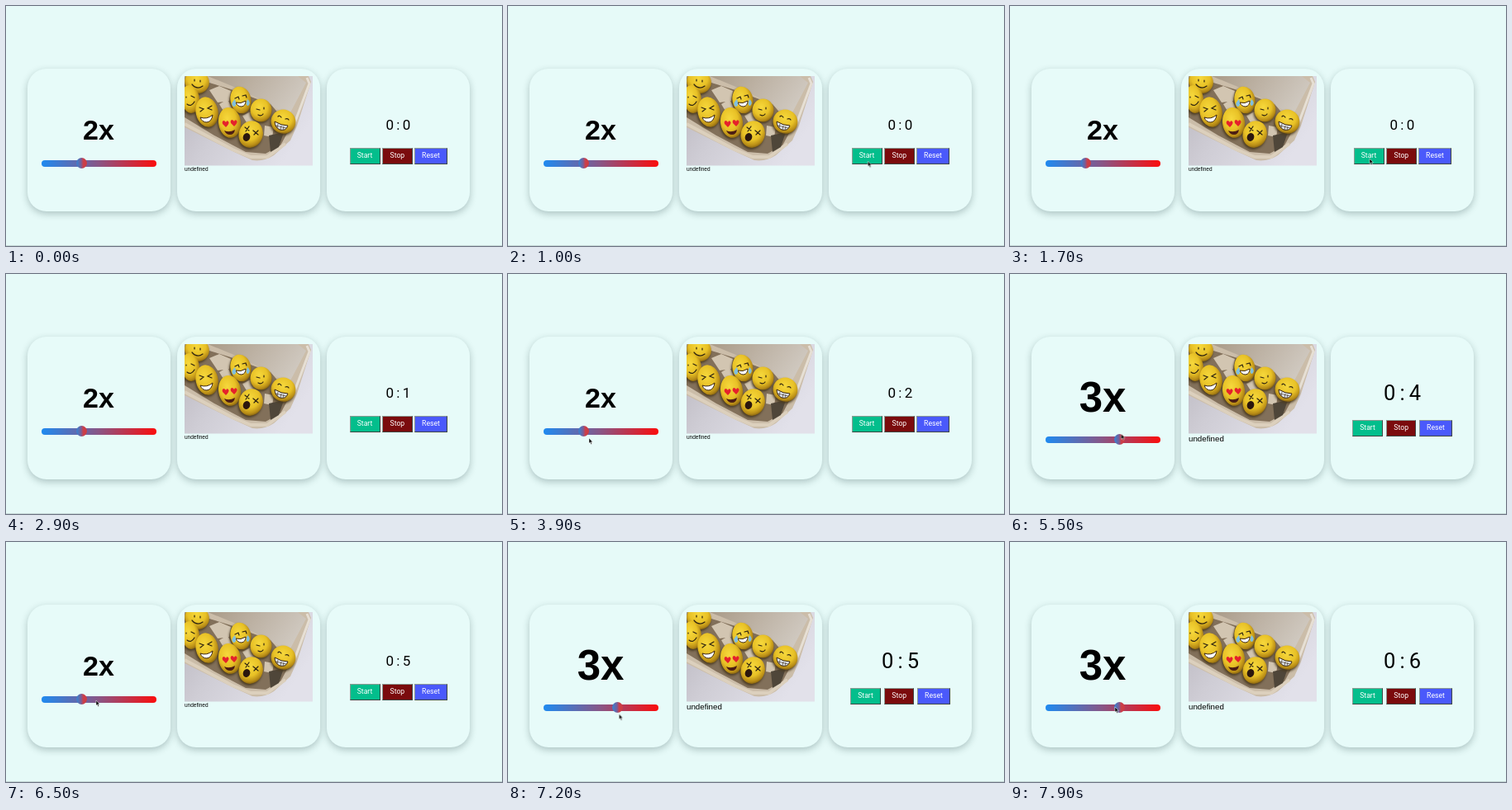
Recreate the animation shown at these times as an HTML page. Size 600 px wide and 291 px high, loop 8 s.

```html
<!DOCTYPE html>
<html lang="en">
<head>
<meta charset="utf-8">
<title>Three cards</title>
<style>
  html, body { margin: 0; width: 100%; height: 100%; overflow: hidden; }
  body { background: #e6faf8; font-family: "Liberation Sans", Arial, sans-serif; color: #000; }

  /* --v is the slider value; sizes and positions follow from it */
  .stage {
    --v: 2;
    position: relative; width: 600px; height: 291px; overflow: hidden;
    animation: zoom 8s step-end infinite;
  }
  .stage > * { position: absolute; box-sizing: border-box; white-space: nowrap; }
  .floor { left: 0; top: 290px; width: 600px; height: 1px; background: #c6d9d7; }

  .card {
    top: 76px; width: 173px; height: 172.5px; border-radius: 23px;
    background: #e7fbf9; box-shadow: 0 3px 8px rgba(20, 50, 50, .27);
  }

  .title {
    left: 25.5px; width: 173px; top: 110.3px; line-height: 80px; text-align: center;
    font-weight: bold; font-size: calc(var(--v) * 17px);
  }
  .title::before { content: "2x"; animation: title 8s step-end infinite; }

  .track {
    left: 43px; width: 138.5px; height: 8px; border-radius: 4px;
    top: calc(167px + var(--v) * 10px);
    background: linear-gradient(90deg, #1f8af0, #8a5585 50%, #fb0d0d);
  }
  .thumb {
    width: 13px; height: 13px; border-radius: 50%;
    left: calc(1.7px + var(--v) * 41.5px); top: calc(164.3px + var(--v) * 10px);
    background: linear-gradient(90deg, #3f7cca 10%, #775d98 45%, #c8404c 65%, #d03a40);
  }

  .photo { left: 216px; top: 85px; }
  .caption { left: 216px; top: 193.9px; line-height: 1.15; font-size: calc(var(--v) * 3.25px); }

  .timer, .btn { font-family: Roboto, Arial, sans-serif; }
  .timer {
    left: calc(474px - var(--v) * 7.3px); top: 124px; line-height: 40px;
    font-size: calc(var(--v) * 8.5px); letter-spacing: .2em;
  }
  .timer::before { content: "0:0"; animation: count 8s step-end infinite; }

  .btn {
    top: calc(162px + var(--v) * 5px); height: 19.5px; line-height: 17.5px;
    border: 1px outset #8c9a93; color: #fff; font-size: 8.7px; text-align: center;
  }
  .start { left: calc(418.5px - var(--v) * 1.5px); width: 37px; background: #03be8c; }
  .stop  { left: calc(455.5px - var(--v) * .2px); width: 36.5px; background: #7b0b0d; }
  .reset { left: calc(492px + var(--v) * 1px); width: 40px; background: #4a59fb; }

  .cursor {
    left: 0; top: 0; overflow: visible;
    animation: move 8s ease-in-out infinite, show 8s step-end infinite;
  }

  @keyframes zoom { 0%, 100% { --v: 2; } 64% { --v: 3; } 76% { --v: 2; } 87% { --v: 3; } }
  @keyframes title {
    0%, 100% { content: "2x"; } 64% { content: "3x"; }
    76% { content: "2x"; } 87% { content: "3x"; }
  }
  @keyframes count {
    0%, 100% { content: "0:0"; }
    28.75% { content: "0:1"; }
    41.25% { content: "0:2"; }
    53.75% { content: "0:3"; }
    66.25% { content: "0:4"; }
    78.75% { content: "0:5"; }
    91.25% { content: "0:6"; }
  }
  @keyframes show {
    0%, 100% { visibility: hidden; }
    6.25% { visibility: visible; }
    25% { visibility: hidden; }
    42.5% { visibility: visible; }
  }
  @keyframes move {
    0%, 6.25% { transform: translate(446px, 271px); }
    13.5%, 21.5% { transform: translate(435px, 185px); }
    25% { transform: translate(431px, 233px); }
    25.1%, 42.5% { transform: translate(120px, 278px); }
    48%, 49.5% { transform: translate(98px, 199px); }
    54%, 60% { transform: translate(93px, 189px); }
    67%, 71.5% { transform: translate(134.5px, 194px); }
    80%, 82% { transform: translate(109px, 192px); }
    91%, 94.5% { transform: translate(135px, 209px); }
    98.5%, 100% { transform: translate(127px, 200px); }
  }
</style>
</head>
<body>
<div class="stage">
  <div class="floor"></div>
  <div class="card" style="left:26px"></div>
  <div class="card" style="left:207px"></div>
  <div class="card" style="left:388px"></div>

  <div class="title"></div>
  <div class="track"></div>
  <div class="thumb"></div>

  <svg class="photo" width="155" height="108.5" viewBox="0 0 155 108.5">
    <defs>
      <linearGradient id="table" x2="1" y2=".5">
        <stop offset="0" stop-color="#b9b6be"/><stop offset=".45" stop-color="#cfcdd5"/>
        <stop offset="1" stop-color="#e2e1ea"/>
      </linearGradient>
      <linearGradient id="lid" x2="1" y2=".3">
        <stop offset="0" stop-color="#a99b88"/><stop offset=".5" stop-color="#bdb2a4"/>
        <stop offset="1" stop-color="#cfc8bf"/>
      </linearGradient>
      <radialGradient id="yolk" cx=".42" cy=".36" r=".68">
        <stop offset="0" stop-color="#f6d83c"/><stop offset=".55" stop-color="#e8c126"/>
        <stop offset=".85" stop-color="#b78b16"/><stop offset="1" stop-color="#7d5c12"/>
      </radialGradient>
    </defs>
    <rect width="155" height="108.5" fill="url(#table)"/>
    <!-- carton -->
    <path d="M22 0H150L153 7 136 60 128 78 108 96Q96 104 82 102L60 92 28 76 0 62V0Z" fill="#cbbda9"/>
    <path d="M28 0H137L147 8 126 48 96 30 62 14Z" fill="url(#lid)"/>
    <path d="M148 2 151 9 132 60" fill="none" stroke="#e6dfd4" stroke-width="3"/>
    <path d="M30 8 56 16 104 34 128 62 116 84 98 94 74 92 36 72 0 50V30Z" fill="#82705a"/>
    <path d="M0 58 30 74 58 89 80 98 100 98 122 82" fill="none" stroke="#dcd0bd" stroke-width="4"/>
    <path d="M30 17 42 12 56 18 54 30 40 32ZM42 34 52 28 58 40 48 44ZM70 48 82 42 88 55 76 58ZM97 60 108 62 106 74 96 72Z" fill="#d2c5b1"/>
    <path d="M102 72 120 68 114 86 104 92Z" fill="#4f4639"/>
    <!-- eggs -->
    <g fill="url(#yolk)" style="filter:drop-shadow(-1px 2px 1.5px #4a3a20)">
      <ellipse cx="15" cy="7" rx="15" ry="14" transform="rotate(25 15 7)"/>
      <ellipse cx="7" cy="28" rx="11" ry="17" transform="rotate(-8 7 28)"/>
      <ellipse cx="68" cy="29" rx="12.5" ry="16.5" transform="rotate(-12 68 29)"/>
      <ellipse cx="92.5" cy="41.5" rx="13" ry="14"/>
      <ellipse cx="119.5" cy="55" rx="15" ry="14.5" transform="rotate(25 119 55)"/>
      <ellipse cx="27" cy="43.5" rx="13.5" ry="18.5" transform="rotate(-12 27 43)"/>
      <ellipse cx="54.5" cy="56.5" rx="13.5" ry="18.5" transform="rotate(-8 54 56)"/>
      <ellipse cx="80" cy="70.5" rx="14.5" ry="16.5" transform="rotate(18 80 71)"/>
    </g>
    <!-- faces -->
    <g fill="none" stroke="#2d2210" stroke-width="1.2" stroke-linecap="round">
      <path d="M12 4v2M19 5v2M9 10Q15 17 22 12M2 25v1M8 24l4 2M3 34Q8 38 12 31"/>
      <path d="M18 38l5 2-4 3M33 36l-5 3 5 2"/>
      <path d="M61 27l4-2 1 3M70 24l4-1 1 3"/>
      <path d="M87 40l4 1M96 38v2M89 47q4 2 6-1"/>
      <path d="M113 49q2-2 4 1M122 52q3-1 4 1"/>
      <path d="M73 62l5 4m0-5l-4 6M83 66l6 5m0-5l-5 5"/>
    </g>
    <path d="M19 50Q27 53 34 47 33 55 27 56 21 56 19 50Z" fill="#fff" stroke="#3a2410"/>
    <path d="M62 32Q68 34 74 30 74 36 69 37 64 37 62 32Z" fill="#fff" stroke="#3a2410"/>
    <path d="M61 28q-6 5-2 9 5 0 2-9ZM76 28q5 4 1 8-4 0-1-8Z" fill="#7fbfe0"/>
    <path d="M109 55Q117 60 125 60 123 67 115 65 109 62 109 55Z" fill="#dfe6ee" stroke="#3a2410"/>
    <path d="M113 58l-1 5m5-3-1 5m4-4-1 4M110 60l13 3" stroke="#3a2410" stroke-width=".6"/>
    <path d="M48 66Q54 69 61 65 60 71 55 71 50 71 48 66Z" fill="#4b1d13"/>
    <g fill="#e5212b">
      <path id="heart" d="M50 62l-4-4q-1-3 1-4 2 0 3 2 1-3 3-1 2 2-3 7Z"/>
      <use href="#heart" x="10" y="-1"/>
    </g>
    <ellipse cx="75" cy="74" rx="4.3" ry="5" fill="#2b170e" transform="rotate(18 75 74)"/>
  </svg>
  <div class="caption">undefined</div>

  <div class="timer"></div>
  <div class="btn start">Start</div>
  <div class="btn stop">Stop</div>
  <div class="btn reset">Reset</div>

  <svg class="cursor" width="6" height="9">
    <path d="M0 0V6.3L1.4 5.1 2.4 7.4 3.5 6.9 2.5 4.7H4.4Z" fill="#000" stroke="#fff" stroke-width=".5"/>
  </svg>
</div>
</body>
</html>
```
